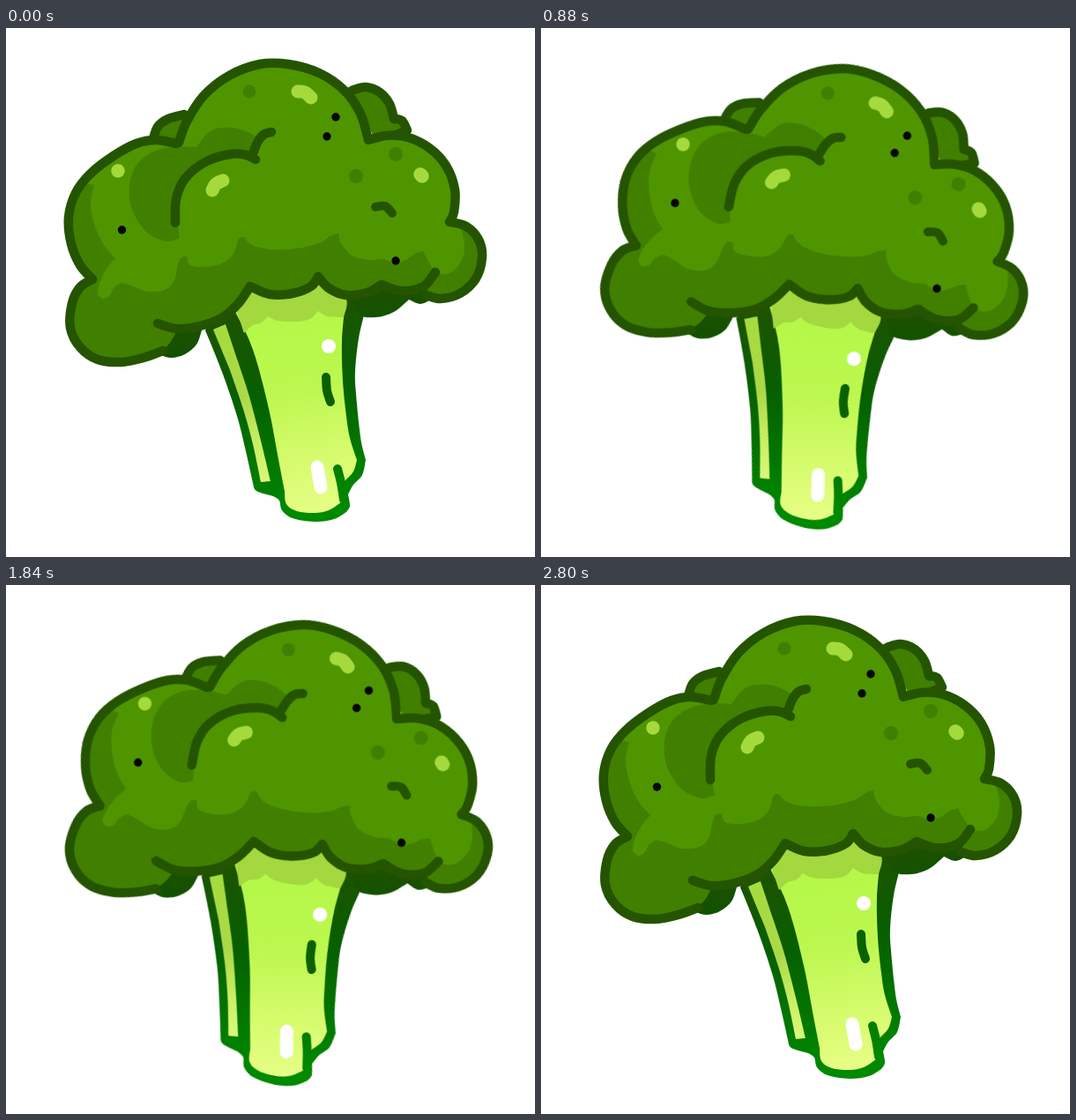
An HTML page that plays this animation: 600 px wide and 600 px high, repeating every 2.88 s.

```html
<!DOCTYPE html>
<html lang="en">
<head>
<meta charset="utf-8">
<title>Swaying broccoli</title>
<style>
  html, body { margin: 0; width: 100%; height: 100%; overflow: hidden; background: #fff; }
  svg { display: block; width: 100vw; height: 100vh; }
  #plant { transform-origin: 291px 314px; }
</style>
</head>
<body>
<svg viewBox="0 0 600 600">
  <defs>
    <linearGradient id="flesh" gradientUnits="userSpaceOnUse" x1="310" y1="325" x2="352" y2="548">
      <stop offset="0" stop-color="#b4f848"/>
      <stop offset=".38" stop-color="#bcf74f"/>
      <stop offset=".72" stop-color="#d5fb6c"/>
      <stop offset="1" stop-color="#e6fd85"/>
    </linearGradient>
    <linearGradient id="side" gradientUnits="userSpaceOnUse" x1="244" y1="340" x2="294" y2="516">
      <stop offset="0" stop-color="#a5dc3e"/>
      <stop offset=".45" stop-color="#acd848"/>
      <stop offset=".75" stop-color="#c9ef63"/>
      <stop offset="1" stop-color="#dcf87a"/>
    </linearGradient>
    <linearGradient id="rind" gradientUnits="userSpaceOnUse" x1="308" y1="318" x2="350" y2="550">
      <stop offset="0" stop-color="#1d5200"/>
      <stop offset=".4" stop-color="#066000"/>
      <stop offset="1" stop-color="#008a00"/>
    </linearGradient>
    <linearGradient id="under" gradientUnits="userSpaceOnUse" x1="300" y1="305" x2="311" y2="370">
      <stop offset="0" stop-color="#215000"/>
      <stop offset="1" stop-color="#0b5200"/>
    </linearGradient>
    <clipPath id="headClip"><path id="headShape"/></clipPath>
  </defs>
  <g id="plant" stroke-linecap="round" stroke-linejoin="round"></g>
</svg>
<script>
const NS = 'http://www.w3.org/2000/svg';
const plant = document.getElementById('plant');
const LINE = '#245400', LEAF = '#4f9500', SHADE = '#417f00', SHINE = '#a4da3c';

// Smooth curve through points; "/" marks a corner.
function curve(text, close) {
  const runs = text.split('/').map(r => r.trim().split(/\s+/).map(p => p.split(',').map(Number)));
  let d = 'M' + runs[0][0], last = null;
  for (const run of runs) {
    const p = last ? [last, ...run] : run;
    for (let i = 0; i < p.length - 1; i++) {
      const a = p[i - 1] || p[i], b = p[i], c = p[i + 1], e = p[i + 2] || c;
      const near = [0, 1].map(k => +(b[k] + (c[k] - a[k]) / 6).toFixed(1));
      const far = [0, 1].map(k => +(c[k] - (e[k] - b[k]) / 6).toFixed(1));
      d += `C${near} ${far} ${c}`;
    }
    last = p[p.length - 1];
  }
  return d + (close ? 'Z' : '');
}

function add(tag, attrs, parent = plant) {
  const el = document.createElementNS(NS, tag);
  for (const k in attrs) el.setAttribute(k, attrs[k]);
  return parent.appendChild(el);
}
const fill = (pts, color, parent) => add('path', { d: curve(pts, true), fill: color }, parent);
const line = (pts, color = LINE, width = 10.5, inside = 'none') =>
  add('path', { d: curve(pts), fill: inside, stroke: color, 'stroke-width': width });
const dot = (x, y, r, color) => add('circle', { cx: x, cy: y, r, fill: color });

// Lumps behind the crown
line('167,126 172,112 184,103 202,98 / 230,130', LINE, 10.5, SHADE);
line('392,71 408,67 424,73 435,86 440,103 / 449,105 455,116 / 420,130', LINE, 10.5, SHADE);

// Stalk: dark body first, flesh on top
fill(`226,343 / 245,390 262,440 272,480 280,516 / 284,525 303,531 / 310,536 313,547 325,556 350,560
  372,557 386,549 / 390,542 388,529 / 394,518 404,507 408,490 / 403,470 400,447 / 397,415 396,390 400,352
  408,318 / 385,296 240,310`, 'url(#rind)');
fill('235,342 / 249,336 / 263,378 276,418 289,468 300,514 / 289,515 / 280,472 269,432 254,388', 'url(#side)');
const flesh = `260,322 / 275,352 286,384 299,436 308,484 316,525 / 318,540 330,548 350,550 366,547 380,538 /
  379,525 384,514 / 394,503 398,490 / 390,465 386,440 382,400 381,355 385,310 / 354,280 280,290`;
fill(flesh, 'url(#flesh)');
fill(`260,315 / 270,346 / 280,337 290,334 297,327 / 308,332 328,333 345,330 354,321 /
  365,327 383,328 / 385,305 354,280 280,290`, '#a3d83e');
line('376,500 380,516 383,535', 'url(#rind)', 10);
line('363,396 364,411 368,424', '#0b6000', 10);
line('353,498 357,521', '#fff', 15);
dot(366, 361, 8, '#fff');

// Dark underside
fill('160,366 / 175,371 188,374 203,370 216,359 222,343 / 225,330 180,330', 'url(#under)');
fill('388,295 / 400,324 420,328 440,322 457,308 / 470,313 482,308 / 487,280', 'url(#under)');

// Crown
const crown = `98,285 / 84,269 74,245 71,215 79,187 96,165 122,145 148,131 170,127 193,131 /
  203,107 224,77 253,54 288,41 320,41 355,51 384,71 402,97 411,127 /
  432,122 456,124 480,136 499,156 509,183 508,209 503,220 /
  522,225 536,240 540,260 533,284 515,301 493,307 476,302 / 485,282 /
  475,292 458,298 442,297 426,291 / 410,300 386,303 366,295 354,282 /
  346,293 325,301 299,302 277,293 / 267,308 246,328 220,338 194,342 /
  182,361 156,374 130,379 104,376 84,362 73,340 75,312 84,294 98,285`;
document.getElementById('headShape').setAttribute('d', curve(crown, true));
fill(crown, LEAF);

const shades = add('g', { 'clip-path': 'url(#headClip)' });
fill(`60,170 / 100,178 / 96,200 101,225 111,246 124,261 / 114,273 106,289 104,302 / 110,307 118,303 122,295 130,289 /
  142,292 160,299 180,297 191,286 194,272 198,261 205,259 / 209,269 226,271 245,267 258,256 264,239 270,237 /
  279,246 300,251 330,250 355,244 368,236 377,233 / 380,244 392,258 412,263 428,262 442,268 /
  455,262 464,256 473,253 / 480,266 490,278 505,277 517,263 520,244 514,222 /
  570,220 / 560,400 / 50,400`, SHADE, shades);
fill(`197,134 / 170,139 149,154 140,178 143,206 159,231 181,242 197,238 / 193,215 /
  193,194 205,169 228,151 255,142 283,145 / 289,130 276,119 256,113 233,116 216,135`, SHADE, shades);

line(`98,285 / 84,269 74,245 71,215 79,187 96,165 122,145 148,131 170,127 193,131`);
line(`196,130 205,106 224,77 253,54 288,41 320,41 355,51 384,71 402,97 411,127 /
  432,122 456,124 480,136 499,156 509,183 508,209 503,220 /
  522,225 536,240 540,260 533,284 515,301 493,307 477,303`);
line('98,285 84,294 75,312 73,340 84,362 104,376 130,379 156,374 178,366');
line(`172,335 193,341 220,338 246,328 264,312 277,293 / 299,302 325,301 346,293 354,282 /
  366,295 386,303 410,300 426,291 / 442,297 458,298 475,292 487,277`);
line('192,221 193,194 203,171 226,152 255,143 272,144 283,149');
line('281,140 285,130 292,121 301,118');
line('419,203 430,202 438,210', LINE, 10);

// Spots and highlights
[[276, 72, 7.5], [397, 168, 8], [442, 143, 8]].forEach(s => dot(...s, SHADE));
line('331,72 339,73 346,79', SHINE, 15);
line('234,184 238,177 246,173', SHINE, 15);
line('470,166 472,168', SHINE, 15.5);
dot(127, 162, 7.7, SHINE);
[[374, 101], [364, 123], [131.5, 229], [442, 264]].forEach(([x, y]) => dot(x, y, 4.7, '#060606'));

// Sway: quicker out, slower back, held in 80 ms steps
const LOOP = 2880, STEP = 80, PEAK = 1280, BACK = 2800, TILT = 15;
const ease = u => (1 - Math.cos(Math.PI * u)) / 2;
const angle = t => TILT * (t < PEAK ? ease(t / PEAK) : ease(Math.max(0, (BACK - t) / (BACK - PEAK))));
const poses = [];
for (let t = 0; t <= LOOP; t += STEP)
  poses.push({ transform: `rotate(${angle(t).toFixed(3)}deg)`, offset: t / LOOP, easing: 'step-end' });
plant.animate(poses, { duration: LOOP, iterations: Infinity });
</script>
</body>
</html>
```
